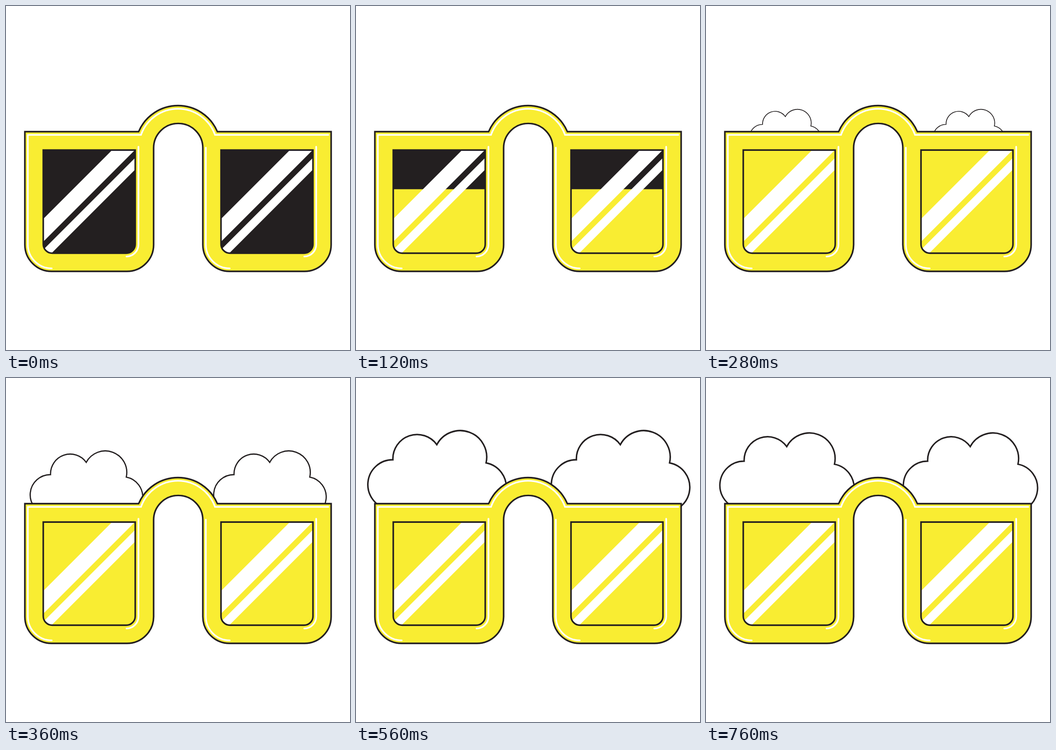
Write an HTML page that moves like this. It is 748 px wide and 748 px high and loops after 800 ms.

```html
<!DOCTYPE html>
<html lang="en">
<head>
<meta charset="utf-8">
<title>Beer glasses</title>
<style>
  html, body { margin: 0; width: 100%; height: 100%; overflow: hidden; background: #fff; }
  svg { display: block; width: 100%; height: 100%; }
  .line { stroke: #231f20; stroke-width: 3.4; }
  .shine { fill: none; stroke: #fff; stroke-width: 3.6; stroke-linecap: round; }
</style>
</head>
<body>
<svg viewBox="0 0 748 748">
  <defs>
    <path id="lens" d="M81 313.3H281V518A19.5 19.5 0 0 1 261.5 537.5H100.5A19.5 19.5 0 0 1 81 518Z"/>
    <clipPath id="inside"><use href="#lens"/></clipPath>
    <path id="foam" class="line" fill="#fff" d="M66 285A56 56 0 0 1 77 174A54.6 54.6 0 0 1 176 140
      A59.7 59.7 0 0 1 287 181A56 56 0 0 1 275 292Z"/>
    <g id="glass">
      <g clip-path="url(#inside)">
        <rect id="tint" x="79" y="311" width="204" height="230" fill="#231f20"/>
        <path fill="#fff" d="M244 300L-6 550H43.5L293.5 300ZM311 300L61 550H86.5L336.5 300Z"/>
      </g>
      <use href="#lens" class="line" fill="none"/>
      <path class="shine" d="M288 306V518.5A26 26 0 0 1 262 544.7"/>
    </g>
  </defs>
  <g id="foams">
    <use href="#foam"/>
    <use href="#foam" x="399"/>
  </g>
  <path class="line" fill="#f9ed32" d="M41 273.2H288.4A93 93 0 0 1 459.6 273.2H707V519
    A58 58 0 0 1 649 577H486A58 58 0 0 1 428 519V308.8A53.5 53.5 0 0 0 321 308.8V519
    A58 58 0 0 1 263 577H99A58 58 0 0 1 41 519Z"/>
  <path class="shine" d="M99.5 570.5A52 52 0 0 1 47.5 518.5V280.2H293.5A85.5 85.5 0 0 1 454.5 280.2H701"/>
  <path class="shine" d="M434.5 308V518.5A52 52 0 0 0 486.5 570.5"/>
  <use href="#glass"/>
  <use href="#glass" x="386.5"/>
</svg>
<script>
  const LOOP = 800, STEP = 40, GROW = 80, FULL = 480, BEAT = 200;
  const tint = document.getElementById('tint');
  const foams = document.querySelectorAll('#foams use');

  const ease = p => {
    p = Math.min(1, Math.max(0, p));
    return p * p * (3 - 2 * p);
  };

  // Foam swells to full size, then breathes between 100% and 90%.
  function foamScale(t) {
    if (t < FULL) return ease((t - GROW) / (FULL - GROW));
    const beat = (t - FULL) / BEAT;
    return beat < 1 ? 1 - 0.1 * ease(beat) : 0.9 + 0.1 * ease(beat - 1);
  }

  function draw(t) {
    tint.setAttribute('height', Math.max(0, 229 - t * 1.18));
    const s = foamScale(t);
    const sink = 60 * (1 - ease((t - GROW) / (FULL - GROW)));
    foams.forEach((foam, i) => {
      foam.setAttribute('visibility', s > 0 ? 'visible' : 'hidden');
      foam.setAttribute('transform',
        `translate(${169 + 399 * i} ${281 + sink}) scale(${s}) translate(${-169 - 399 * i} -281)`);
    });
  }

  const start = performance.now();
  function tick() {
    const t = (performance.now() - start) % LOOP;
    draw(Math.floor(t / STEP) * STEP);
    requestAnimationFrame(tick);
  }
  tick();
</script>
</body>
</html>
```
